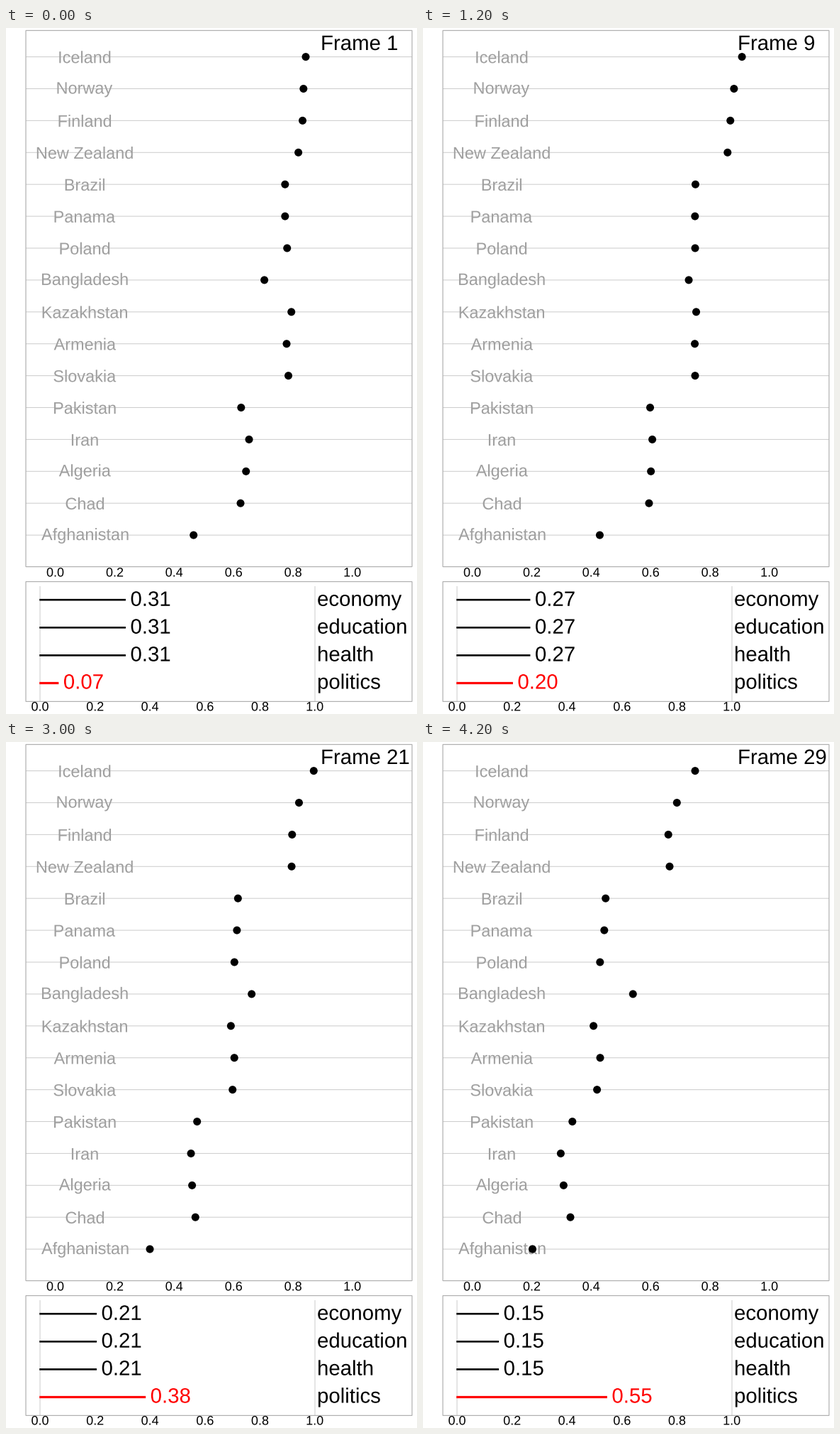
Recreate the animation shown at these times as a matplotlib script. Size 580 by 966 pixels, loop 4350 ms.

```python
import numpy as np
import matplotlib.pyplot as plt
from matplotlib.animation import FuncAnimation
from matplotlib.patches import Circle, PathPatch, Rectangle
from matplotlib.textpath import TextPath
from matplotlib.transforms import Affine2D

W, H, DPI = 580, 966, 64
FRAMES, INTERVAL = 29, 150
GRID, BORDER, LABEL = "#cccccc", "#b0b0b0", "#9f9f9f"
LEFT, RIGHT = 28, 573

# country: dot x at the start and at the end of the tour
COUNTRIES = {
    "Iceland": (423.0, 384.0),
    "Norway": (419.8, 358.3),
    "Finland": (418.5, 346.2),
    "New Zealand": (412.6, 348.0),
    "Brazil": (393.8, 257.7),
    "Panama": (393.8, 255.8),
    "Poland": (396.7, 249.8),
    "Bangladesh": (364.6, 296.3),
    "Kazakhstan": (402.7, 240.6),
    "Armenia": (396.0, 250.0),
    "Slovakia": (398.5, 245.6),
    "Pakistan": (331.8, 210.8),
    "Iran": (343.0, 194.4),
    "Algeria": (338.7, 198.4),
    "Chad": (331.0, 208.0),
    "Afghanistan": (264.7, 154.5),
}
PARTS = ["economy", "education", "health", "politics"]

SCORE_X0, SCORE_UNIT = 69.5, 419.5
BAR_X0, BAR_UNIT = 48, 388
BIG = 29.4
THETA_START, THETA_EQUAL, THETA_END = np.radians([7.1, 30, 64.3])
EQUAL_STEP = 11  # equal weights are held for two frames

plt.rcParams["font.family"] = "Liberation Sans"
fig = plt.figure(figsize=(W / DPI, H / DPI), dpi=DPI, facecolor="white")
ax = fig.add_axes([0, 0, 1, 1])
ax.set_xlim(0, W)
ax.set_ylim(H, 0)
ax.axis("off")


def pt(px):
    return px * 72 / DPI


def text_path(x, y, s, size, centered=False):
    """Outline of a text, placed at fractions of a pixel."""
    path = TextPath((0, 0), s, size=size)
    if centered:
        box = path.get_extents()
        x -= (box.x0 + box.x1) / 2
    return Affine2D().scale(1, -1).translate(x, y).transform_path(path)


def write(x, y, s, size, color="black", centered=False, z=4):
    path = text_path(x, y, s, size, centered)
    return ax.add_patch(PathPatch(path, fc=color, lw=0, zorder=z, snap=False))


def rule(xs, ys, color, width=1, z=1):
    return ax.plot(xs, ys, color=color, lw=pt(width), zorder=z, snap=False,
                   solid_capstyle="butt")[0]


def panel(top, bottom):
    ax.add_patch(Rectangle((LEFT, top), RIGHT - LEFT, bottom - top, fill=False,
                           ec=BORDER, lw=pt(1.2), zorder=2, snap=False))


def ticks(x0, unit, baseline):
    for i in range(6):
        write(x0 + unit * i / 5, baseline, f"{i / 5:.1f}", 18, centered=True)


# upper panel
dot_y = 40.6 + 44.9 * np.arange(len(COUNTRIES))
dots = []
for name, y in zip(COUNTRIES, dot_y):
    rule([LEFT, RIGHT], [y, y], GRID)
    drop = 7 if set(name) & set("gy") else 8.7
    write(111.3, y + drop, name, 23.5, LABEL, True, 3)
    dots.append(ax.add_patch(Circle((0, y), 5.5, fc="black", lw=0, zorder=5)))
panel(3.5, 758.6)
ticks(SCORE_X0, SCORE_UNIT, 772.5)
counter = write(444, 31, "Frame", BIG, z=6)

# lower panel
for x in (BAR_X0, BAR_X0 + BAR_UNIT):
    rule([x, x], [786, 948], GRID)
panel(779.6, 948.4)
ticks(BAR_X0, BAR_UNIT, 961.5)
bar_y = 805.2 + 39.1 * np.arange(len(PARTS))
base_y = 813.8 + 38.9 * np.arange(len(PARTS))
bars, values = [], []
for part, y, base in zip(PARTS, bar_y, base_y):
    active = part == "politics"
    color = "red" if active else "black"
    write(439, base, part, BIG)
    bars.append(rule([BAR_X0, BAR_X0], [y, y], color, 3.2 if active else 2.6, 4))
    values.append(write(BAR_X0, base, "0", BIG, color))

starts, ends = np.array(list(COUNTRIES.values())).T - SCORE_X0


def angle(frame):
    """Angle of the projection towards politics."""
    if frame <= EQUAL_STEP:
        return np.interp(frame, [0, EQUAL_STEP], [THETA_START, THETA_EQUAL])
    return np.interp(frame, [EQUAL_STEP + 1, FRAMES - 1], [THETA_EQUAL, THETA_END])


def update(frame):
    theta = angle(frame)
    score = starts * np.sin(THETA_END - theta) + ends * np.sin(theta - THETA_START)
    score /= np.sin(THETA_END - THETA_START)
    for dot, x, y in zip(dots, SCORE_X0 + score, dot_y):
        dot.set_center((x, y))

    t = np.tan(theta)
    politics = t / (np.sqrt(3) + t)
    weights = [(1 - politics) / 3] * 3 + [politics]
    for bar, value, base, w in zip(bars, values, base_y, weights):
        end = BAR_X0 + BAR_UNIT * w
        bar.set_xdata([BAR_X0 - 0.8, end + 0.3])
        value.set_path(text_path(end + 6.8, base, f"{w:.2f}", BIG))
    counter.set_path(text_path(444, 31, f"Frame {frame + 1}", BIG))
    return [*dots, counter, *bars, *values]


anim = FuncAnimation(fig, update, frames=FRAMES, interval=INTERVAL,
                     repeat=True, repeat_delay=0, blit=False)
plt.show()
```
